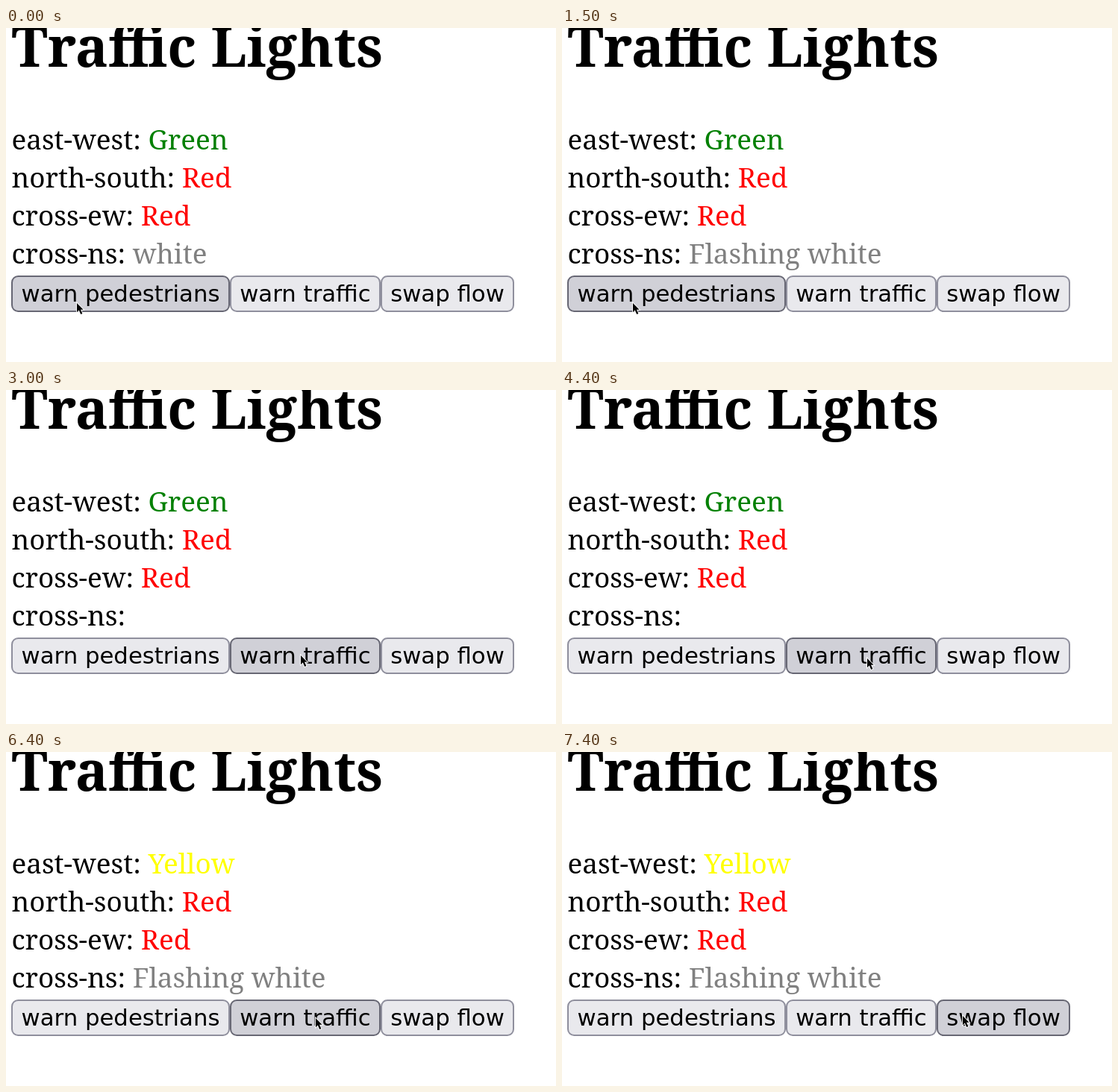
Animation of 737 by 448 pixels, one loop 8000 ms. Source, as an HTML page:

```html
<!DOCTYPE html>
<html lang="en">
<head>
<meta charset="utf-8">
<title>Traffic Lights</title>
<style>
  html, body { margin: 0; width: 100%; height: 100%; overflow: hidden; background: #fff; }
  svg { display: block; width: 737px; height: 448px; cursor: default; }
  /* page zoom is 60/26 */
  text { font: 36.923px "Noto Serif", serif; white-space: pre; }
  .title { font-size: 73.846px; font-weight: bold; }
  .button text { font: 30.769px "DejaVu Sans", sans-serif; text-anchor: middle; }
  .button rect { fill: #e9e9ed; stroke: #8f8f9d; stroke-width: 2; }
  .hover rect { fill: #d0d0d7; stroke: #676774; }
  .active rect { fill: #b1b1b9; stroke: #484851; }
</style>
</head>
<body>
<svg viewBox="0 0 737 448">
  <text class="title" x="7.46" y="52">Traffic Lights</text>
  <g id="lights"></g>
  <g id="buttons"></g>
  <path id="pointer" d="M0 0V12.2L2.8 9.6L5.2 15L7.4 14L5 8.8H8.6Z"
    stroke="#fff" stroke-width="1.8" paint-order="stroke"/>
</svg>
<script>
const LOOP = 8000, STEP = 100, PRESS = 1000, WARN = 4600;
const $ = id => document.getElementById(id);

function add(parent, tag, attrs = {}, text = '') {
  const el = document.createElementNS('http://www.w3.org/2000/svg', tag);
  for (const k in attrs) el.setAttribute(k, attrs[k]);
  el.textContent = text;
  return parent.appendChild(el);
}

const lights = ['east-west', 'north-south', 'cross-ew', 'cross-ns'].map((name, i) => {
  const line = add($('lights'), 'text', { x: 7.46, y: 163 + 51 * i });
  add(line, 'tspan', {}, name + ': ');
  return add(line, 'tspan');
});

let edge = 7;
const buttons = [['warn pedestrians', 293], ['warn traffic', 202], ['swap flow', 179]].map(([label, width]) => {
  const left = edge, el = add($('buttons'), 'g');
  edge += width;
  add(el, 'rect', { x: left + 1, y: 333, width: width - 2, height: 47, rx: 8.2 });
  add(el, 'text', { x: left + width / 2, y: 367 }, label);
  return { el, left, right: edge };
});

// pointer hops: start, end, x, y
const home = [95, 369];
const hops = [
  [1500, 2300, 318, 355], [2300, 3000, 395, 356], [3300, 3500, 398, 356],
  [3800, 4200, 409, 360], [6300, 6400, 415, 357], [6400, 6900, 537, 354]
];

function pointerAt(t) {
  let [x, y] = home;
  for (const [from, to, toX, toY] of hops) {
    const u = Math.min(1, Math.max(0, (t - from) / (to - from)));
    const k = u * u * (3 - 2 * u);
    x += (toX - x) * k;
    y += (toY - y) * k;
  }
  return [Math.round(x), Math.round(y)];
}

// one tick a second, every fifth a step late
function flashOn(t) {
  const late = Math.floor(t / 1000) % 5 === 1 ? STEP : 0;
  return Math.floor((t - 400 - late) / 1000) % 2 === 1;
}

function show(i, text, color) {
  lights[i].textContent = text;
  lights[i].setAttribute('fill', color);
}

function draw(t) {
  const [x, y] = pointerAt(t);
  const state = t === PRESS || t === WARN ? 'active' : 'hover';
  $('pointer').setAttribute('transform', `translate(${x} ${y})`);
  for (const { el, left, right } of buttons) {
    el.setAttribute('class', x >= left && x < right ? 'button ' + state : 'button');
  }
  show(0, ...(t > WARN ? ['Yellow', 'yellow'] : ['Green', 'green']));
  show(1, 'Red', 'red');
  show(2, 'Red', 'red');
  show(3, t <= PRESS ? 'white' : flashOn(t) ? 'Flashing white' : '', 'gray');
}

const start = performance.now();
function tick() {
  const t = (performance.now() - start) % LOOP;
  draw(Math.floor(t / STEP) * STEP);
  requestAnimationFrame(tick);
}
tick();
</script>
</body>
</html>
```
